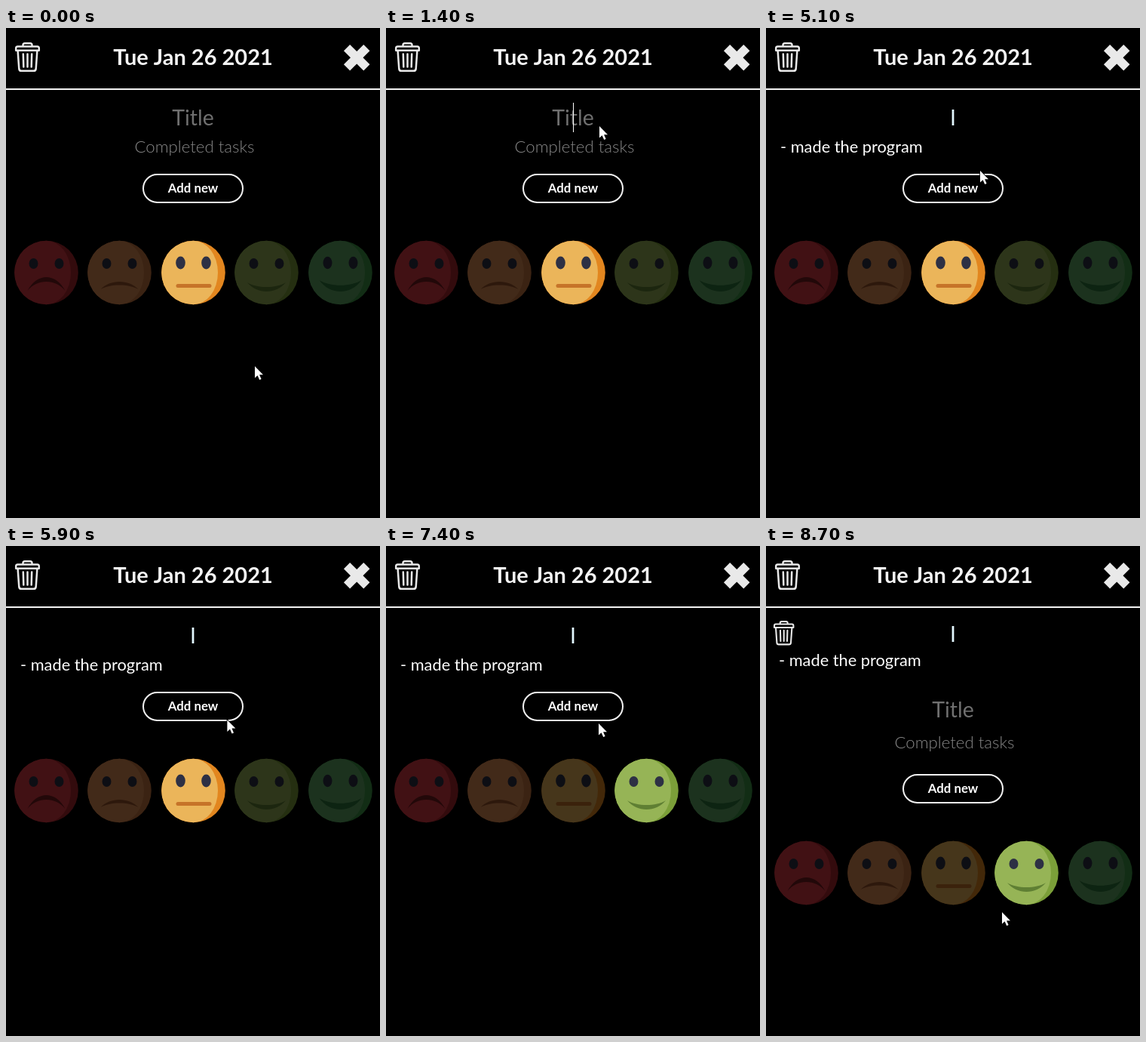
These frames come from a looping animation (496 px wide and 649 px high, 9.9 s). An HTML page with a canvas:

```html
<!DOCTYPE html>
<html lang="en">
<head>
<meta charset="utf-8">
<title>Day planner</title>
<style>
  html, body { margin: 0; width: 100%; height: 100%; overflow: hidden; background: #000; }
  canvas { display: block; }
</style>
</head>
<body>
<canvas id="stage" width="496" height="649"></canvas>
<script>
const ctx = document.getElementById('stage').getContext('2d');
const LOOP = 9900, STEP = 100, INK = '#e9e9e9', HINT = '#707070';

// Keys are [time, ...values], joined by straight lines.
const POINTER = [
  [300, 330, 448], [500, 322, 400], [900, 289, 165], [1100, 283, 130],
  [4700, 283, 130], [5100, 284, 189], [5400, 284, 212],
  [5800, 284, 212], [6300, 331, 304], [6600, 340, 318],
  [6900, 340, 318], [7400, 282, 235], [7700, 270, 217],
  [8100, 270, 217], [8300, 276, 262], [8600, 309, 462], [8700, 313, 485]
];
const NEUTRAL_FADE = [[6800, 1], [7100, 0.3]];
const HAPPY_FADE = [[6200, 0.3], [6300, 0.45], [6500, 0.6], [6800, 0.6], [7100, 1]];
const TYPING = [[4000, '- m'], [4100, '- made'], [4200, '- made the'], [4400, '- made the program']];
const CARET_ON = [[1400, 1900], [2300, 3000], [3000, 3500], [4000, 4800]];

// mouth: half width, corner height, outer bend, inner bend
const FACES = [
  { x: 53.5, skin: '#dc3843', shade: '#ac252c', lips: '#731a1e', eye: [6, 7, -12], mouth: [25, 24, 0, 8] },
  { x: 150.5, skin: '#df8c53', shade: '#c8763f', lips: '#965028', eye: [6, 7, -12], mouth: [25, 22, 8.5, 14.5] },
  { x: 248.5, skin: '#ebb55a', shade: '#e2861f', lips: '#c67329', eye: [6.3, 8.5, -13] },
  { x: 345.5, skin: '#96b456', shade: '#7b9f39', lips: '#5f7f33', eye: [6, 7, -12], mouth: [25.5, 13, 29, 21] },
  { x: 443.5, skin: '#5faa66', shade: '#3c9646', lips: '#2d783c', eye: [6, 8.3, -13], mouth: [28, 10, 30, 19] }
];

function at(keys, t) {
  const i = keys.findIndex(k => k[0] > t);
  if (i < 0) return keys[keys.length - 1].slice(1);
  if (i === 0) return keys[0].slice(1);
  const a = keys[i - 1], b = keys[i], f = (t - a[0]) / (b[0] - a[0]);
  return a.slice(1).map((v, j) => v + (b[j + 1] - v) * f);
}

function text(str, x, y, size, weight, color, align = 'center') {
  ctx.font = `${weight} ${size}px Lato, Carlito, sans-serif`;
  ctx.textAlign = align;
  ctx.fillStyle = color;
  ctx.fillText(str, x, y);
  return ctx.measureText(str).width;
}

const titleText = y => text('I', 248, y, 28.5, 400, '#e4f8ff');
const taskText = (str, x, y) => text(str, x, y, 21.8, 400, '#fff', 'left');

function place(x, y, scale, draw) {
  ctx.save();
  ctx.translate(x, y);
  ctx.scale(scale, scale);
  draw();
  ctx.restore();
}

function trash(x, y, scale) {
  place(x, y, scale, () => {
    ctx.strokeStyle = INK;
    ctx.lineWidth = 2.5;
    ctx.lineCap = ctx.lineJoin = 'round';
    ctx.stroke(new Path2D('M10.5 5V3.5Q10.5 1.2 13 1.2H20Q22.5 1.2 22.5 3.5V5' +
      'M3.5 5.5H29.5Q31.8 5.5 31.8 8V10.8H1.2V8Q1.2 5.5 3.5 5.5Z' +
      'M3.6 11L5.3 35Q5.6 37.8 8.3 37.8H24.7Q27.4 37.8 27.7 35L29.4 11' +
      'M10.8 15.5L11.3 32.5M16.5 15.5V32.5M22.2 15.5L21.7 32.5'));
  });
}

function closeIcon() {
  place(465.2, 39.2, 1, () => {
    ctx.rotate(Math.PI / 4);
    ctx.fillStyle = INK;
    ctx.fillRect(-18.6, -5.8, 37.2, 11.6);
    ctx.fillRect(-5.8, -18.6, 11.6, 37.2);
  });
}

function face({ x, skin, shade, lips, eye, mouth }, y, alpha) {
  const disc = (cx, cy, rx, ry, color) => {
    ctx.fillStyle = color;
    ctx.beginPath();
    ctx.ellipse(cx, cy, rx, ry, 0, 0, 7);
    ctx.fill();
  };
  place(x, y, 1, () => {
    disc(0, 0, 42.3, 42.3, shade);
    ctx.fillStyle = skin;
    ctx.beginPath();
    ctx.arc(0, 0, 42.3, Math.PI / 2, -Math.PI / 2);
    ctx.ellipse(0, 0, 32.5, 42.3, 0, -Math.PI / 2, Math.PI / 2);
    ctx.fill();
    for (const side of [-17, 17]) disc(side, eye[2], eye[0], eye[1], '#2d3044');
    ctx.fillStyle = lips;
    ctx.beginPath();
    if (mouth) {
      const [w, corner, outer, inner] = mouth, c = w * 0.5;
      ctx.moveTo(-w, corner);
      ctx.bezierCurveTo(-c, outer, c, outer, w, corner);
      ctx.bezierCurveTo(c, inner, -c, inner, -w, corner);
    } else {
      ctx.roundRect(-23, 15, 47, 5, 2.5);
    }
    ctx.fill();
    // A black overlay dims the whole face evenly.
    disc(0, 0, 43.5, 43.5, `rgba(0,0,0,${1 - alpha})`);
  });
}

function pointer(x, y) {
  place(x, y, 1, () => {
    const arrow = new Path2D('M0 0V15.5L3.6 12.2L6.2 18L8.6 17L6.1 11.2H11Z');
    ctx.strokeStyle = '#000';
    ctx.lineWidth = 1.6;
    ctx.stroke(arrow);
    ctx.fillStyle = '#fff';
    ctx.fill(arrow);
  });
}

function form(t, added) {
  const titled = t >= 2700 && !added;
  const typed = added ? '' : (TYPING.filter(k => k[0] <= t).pop() || [0, ''])[1];
  const shift = added ? 109 : 0;

  if (titled) titleText(129);
  else text('Title', 248, added ? 227 : 129, 28.5, 400, HINT);

  let typedWidth = 0;
  if (typed) typedWidth = taskText(typed, 19, 165);
  else text('Completed tasks', 250, added ? 268 : 165, 22.2, 300, '#888');

  if (CARET_ON.some(([from, to]) => t >= from && t < to)) {
    ctx.fillStyle = '#fff';
    if (t < 3000) ctx.fillRect(titled ? 252 : 248, 99, 1, 39);
    else ctx.fillRect(20 + Math.round(typedWidth), 142, 1, 29);
  }

  ctx.strokeStyle = '#f2f2f2';
  ctx.lineWidth = 2;
  ctx.beginPath();
  ctx.roundRect(182, 194 + shift, 132, 37, 18.5);
  ctx.stroke();
  text('Add new', 248, 218 + shift, 16.8, 700, '#fff');

  const fades = [0.3, 0.3, at(NEUTRAL_FADE, t)[0], at(HAPPY_FADE, t)[0], 0.3];
  FACES.forEach((f, i) => face(f, 324 + shift, fades[i]));
}

function draw(t) {
  const added = t >= 8100;
  ctx.fillStyle = '#000';
  ctx.fillRect(0, 0, 496, 649);

  trash(12, 19, 1);
  text('Tue Jan 26 2021', 248, 49, 29, 700, '#f4f4f4');
  closeIcon();
  ctx.fillStyle = '#f2f2f2';
  ctx.fillRect(0, 80, 496, 2);

  if (added) {
    trash(10, 99, 0.83);
    titleText(127);
    taskText('- made the program', 17, 159);
  }
  form(t, added);
  pointer(...at(POINTER, t));
}

const start = performance.now();
function tick() {
  const t = (performance.now() - start) % LOOP;
  draw(Math.floor(t / STEP) * STEP);
  requestAnimationFrame(tick);
}
tick();
</script>
</body>
</html>
```
